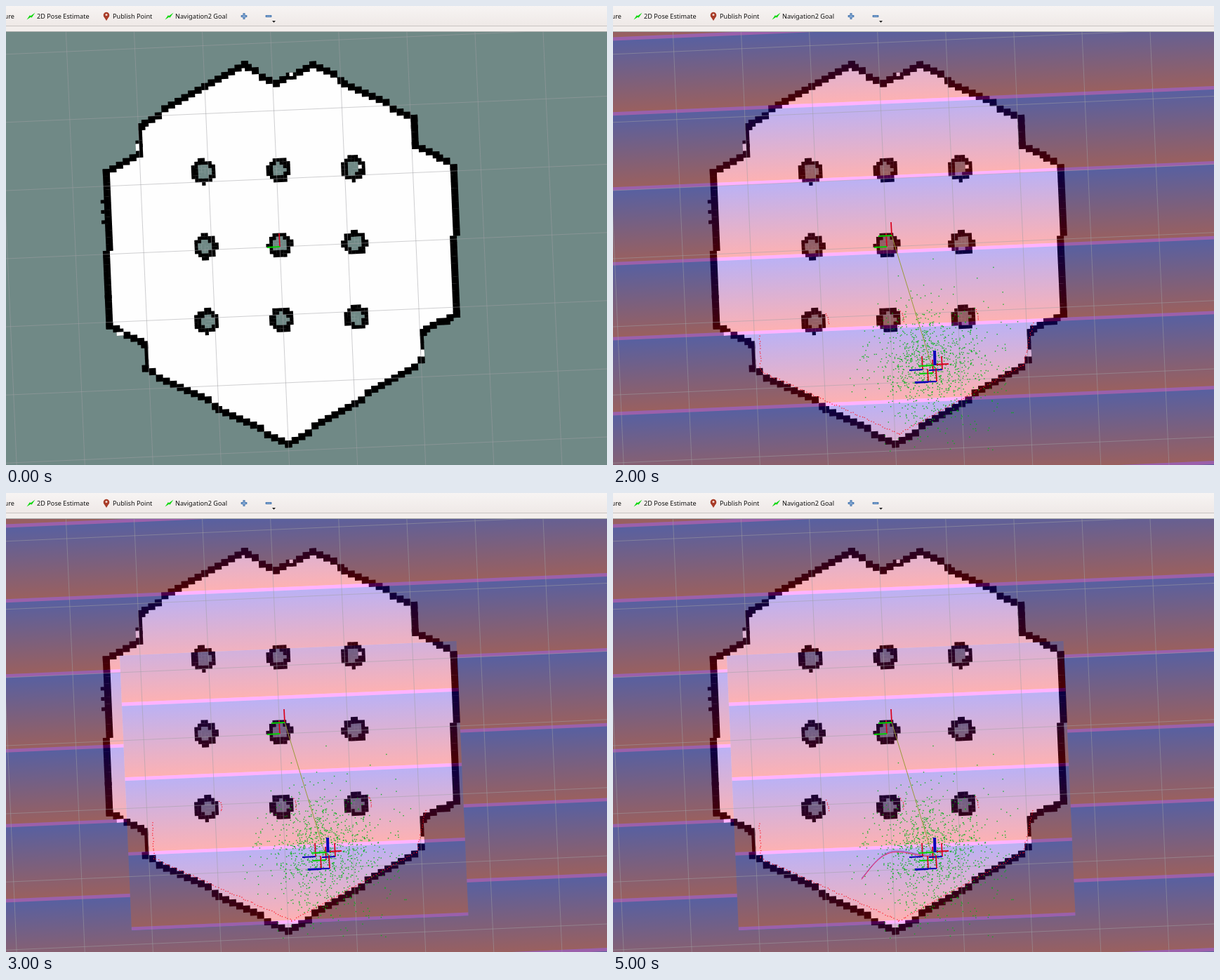
Write an HTML page with a canvas that moves like this. It is 856 px wide and 654 px high and loops after 6 s.

```html
<!DOCTYPE html>
<html lang="en">
<head>
<meta charset="utf-8">
<title>Map view</title>
<style>
  html, body { margin: 0; width: 100%; height: 100%; overflow: hidden; }
  body { position: relative; background: #708986; }
  canvas { position: absolute; left: 0; top: 0; }
  span {
    position: absolute; top: 8px; line-height: 13px; white-space: pre;
    font-family: "Noto Sans", "Open Sans", sans-serif; font-size: 9.17px; color: #111;
  }
</style>
</head>
<body>
<canvas id="view" width="856" height="654"></canvas>
<span style="right:calc(100% - 12px)">Measure</span>
<span style="left:44px">2D Pose Estimate</span>
<span style="left:152px">Publish Point</span>
<span style="left:241px">Navigation2 Goal</span>
<script>
const ctx = document.getElementById('view').getContext('2d');
const W = 856, H = 654, TOP = 37;
const OX = 390, OY = 343, TILT = 0.0435;   // map origin and rotation
const METRE = 97, CELL = METRE / 20, PERIOD = CELL * 22;
const ROBOT = [455, 516], ODOM = [397, 327];
const UNKNOWN = '#708986', FREE = '#fefefe', WALL = '#000';
const RED = '#d8001c', GREEN = '#00d000', BLUE = '#0a00b8';

const corners = [
  [338, 84], [384, 110], [436, 84], [580, 160], [584, 200], [637, 228],
  [642, 438], [592, 466], [592, 506], [400, 624], [201, 518], [198, 481],
  [148, 457], [142, 239], [190, 211], [191, 170]
];

function random(seed) {
  return () => {
    seed = (seed + 0x6D2B79F5) | 0;
    let t = Math.imul(seed ^ seed >>> 15, 1 | seed);
    t = t + Math.imul(t ^ t >>> 7, 61 | t) ^ t;
    return ((t ^ t >>> 14) >>> 0) / 4294967296;
  };
}

function toMap(x, y) {
  const dx = x - OX, dy = y - OY, c = Math.cos(TILT), s = Math.sin(TILT);
  return [dx * c - dy * s, dx * s + dy * c];
}

function inMap(paint) {
  ctx.save();
  ctx.translate(OX, OY);
  ctx.rotate(-TILT);
  paint();
  ctx.restore();
}

const snap = v => Math.round(v / CELL) * CELL;

// Block of w by h cells centred near a stage point
function block(x, y, w, h, color) {
  const [mx, my] = toMap(x, y);
  ctx.fillStyle = color;
  ctx.fillRect(snap(mx - w * CELL / 2), snap(my - h * CELL / 2), w * CELL + 0.3, h * CELL + 0.3);
}

function line(x1, y1, x2, y2, color, width = 2) {
  ctx.strokeStyle = color;
  ctx.lineWidth = width;
  ctx.beginPath();
  ctx.moveTo(x1, y1);
  ctx.lineTo(x2, y2);
  ctx.stroke();
}

function poly(points, color) {
  ctx.fillStyle = color;
  ctx.beginPath();
  points.forEach(p => ctx.lineTo(p[0], p[1]));
  ctx.closePath();
  ctx.fill();
}

function drawWall([x1, y1], [x2, y2]) {
  const dx = x2 - x1, dy = y2 - y1, length = Math.hypot(dx, dy);
  const width = Math.abs(dx) < 4 && length < 60 ? 1 : 2;
  const n = Math.ceil(Math.max(Math.abs(dx), Math.abs(dy)) / (2 * CELL));
  for (let k = 0; k <= n; k++) block(x1 + dx * k / n, y1 + dy * k / n, width, 2, WALL);
}

const pillar = (i, j) => [390.5 + 106.5 * i + 2.6 * j, 340 + 106.5 * j - 2.6 * i];

function eachPillar(visit) {
  for (let j = -1; j <= 1; j++)
    for (let i = -1; i <= 1; i++) visit(...pillar(i, j));
}

// Rough ring of cells around a hollow core
function drawPillar(x, y, rnd) {
  const [mx, my] = toMap(x, y);
  const cx = mx / CELL, cy = my / CELL;
  for (let r = Math.floor(cy) - 4; r <= cy + 4; r++) {
    for (let c = Math.floor(cx) - 4; c <= cx + 4; c++) {
      const d = Math.hypot(c + 0.5 - cx, r + 0.5 - cy) + (rnd() - 0.5) * 0.3;
      if (d > 3.6) continue;
      ctx.fillStyle = d < 2 ? UNKNOWN : WALL;
      ctx.fillRect(c * CELL, r * CELL, CELL + 0.3, CELL + 0.3);
    }
  }
}

function drawMap() {
  const rnd = random(3);
  ctx.fillStyle = UNKNOWN;
  ctx.fillRect(0, TOP, W, H - TOP);
  poly(corners, FREE);
  inMap(() => {
    corners.forEach((p, i) => drawWall(p, corners[(i + 1) % corners.length]));
    for (let y = 278; y < 320; y += 16) block(138, y, 1, 1, WALL);
    block(187, 194, 1, 1, WALL);
    block(187, 201, 1, 2, FREE);
    block(405, 97, 1, 1, FREE);
    block(162, 466, 2, 1, FREE);
    block(593, 494, 1, 2, FREE);
    eachPillar((x, y) => drawPillar(x, y, rnd));
    block(504, 229, 1, 1, FREE);
  });
}

function drawGrid() {
  const color = 'rgba(160,160,164,.5)';
  inMap(() => {
    for (let k = -5 * METRE; k <= 5 * METRE; k += METRE) {
      line(k, -600, k, 600, color, 1);
      line(-600, k, 600, k, color, 1);
    }
  });
}

// Repeating cost bands; base is the centre of one magenta row
function bands(base) {
  for (let k = -4; k < 5; k++) {
    const y = base + k * PERIOD + CELL / 2, end = y + PERIOD - CELL;
    const g = ctx.createLinearGradient(0, y, 0, end);
    g.addColorStop(0, 'rgba(32,0,222,.3)');
    g.addColorStop(1, 'rgba(250,0,5,.3)');
    ctx.fillStyle = g;
    ctx.fillRect(-600, y, 1200, end - y);
    ctx.fillStyle = 'rgba(255,0,255,.3)';
    ctx.fillRect(-600, end, 1200, CELL);
  }
}

function drawCosts(local) {
  const area = [-223, -121, 480, 392];
  inMap(() => {
    ctx.save();
    if (local) {
      ctx.beginPath();
      ctx.rect(-700, -700, 1400, 1400);
      ctx.rect(...area);
      ctx.clip('evenodd');
    }
    bands(7.4);
    ctx.restore();
    if (local) {
      ctx.beginPath();
      ctx.rect(...area);
      ctx.clip();
      bands(55);
    }
  });
}

function drawParticles() {
  const rnd = random(7);
  ctx.fillStyle = 'rgba(0,180,20,.9)';
  for (let i = 0; i < 1050; i++) {
    const spread = i % 5 < 3 ? 36 : 58;
    const r = spread * Math.sqrt(-2 * Math.log(1 - rnd())), a = rnd() * 2 * Math.PI;
    const x = 452 + r * Math.cos(a), y = 512 + r * Math.sin(a);
    if (x > 332 && x < 592 && y > 358 && y < 634) ctx.fillRect(x, y, 1.4, 1.4);
  }
}

// Laser returns: the lower walls and the near faces of the last pillar row
function drawScan(seed) {
  const rnd = random(seed);
  const dot = (x, y) => ctx.fillRect(x + rnd() * 2 - 1, y + rnd() * 2 - 1, 1.2, 1.2);
  const seen = [[208, 470], [210, 520], [407, 609], [584, 511], [598, 450]];
  ctx.fillStyle = '#ff1420';
  for (let i = 1; i < seen.length; i++) {
    const [x, y] = seen[i - 1], dx = seen[i][0] - x, dy = seen[i][1] - y;
    const n = Math.hypot(dx, dy) / 3.6;
    for (let k = 0; k < n; k++) dot(x + dx * k / n, y + dy * k / n);
  }
  for (let i = -1; i <= 1; i++) {
    const [x, y] = pillar(i, 1);
    for (let a = -0.6; a < 0.3; a += 0.15) dot(x + 20 * Math.cos(a), y + 20 * Math.sin(a));
  }
}

// Frame axes: x points up in red, the other axis points left
function axes(x, y, side, length = 19) {
  line(x, y, x - 1, y - 19, RED, 1.7);
  line(x, y, x - length, y + 1, side);
}

function drawRobot() {
  const [x, y] = ROBOT;
  line(...ODOM, x, y, '#9a9a38', 1);
  axes(...ODOM, GREEN);
  axes(x + 1, y + 7, GREEN);
  axes(x - 6, y + 20, BLUE);
  axes(x - 14, y + 2, BLUE);
  axes(x + 14, y + 2, BLUE);
  axes(x + 6, y + 19, BLUE, 31);
  line(x - 20, y - 3, x + 1, y - 4, GREEN);
  line(x + 2, y - 5, x + 23, y - 6, RED);
  line(x + 3, y - 25, x + 3.5, y - 4, BLUE, 4);
}

function drawPath() {
  for (const [off, color] of [[-1, '#9050c0'], [0.6, '#f02058']]) {
    ctx.strokeStyle = color;
    ctx.lineWidth = 1;
    ctx.beginPath();
    ctx.moveTo(354, 550 + off);
    ctx.bezierCurveTo(368, 533, 381, 512 + off, 402, 511 + off);
    ctx.bezierCurveTo(422, 510 + off, 432, 518 + off, 456, 517 + off);
    ctx.stroke();
  }
}

function shade(half, colors) {
  const g = ctx.createLinearGradient(0, -half, 0, half);
  colors.forEach((c, i) => g.addColorStop(i / (colors.length - 1), c));
  return g;
}

function drawArrow(x, y, tipX, tipY, flip) {
  const length = Math.hypot(tipX - x, tipY - y), neck = length - 48;
  ctx.save();
  ctx.translate(x, y);
  ctx.rotate(Math.atan2(tipY - y, tipX - x));
  ctx.scale(1, flip);
  poly([[0, -9.3], [neck, -9.3], [neck, 9.3], [0, 9.3]],
    shade(9.3, ['#006400', '#00e800', '#00ff00', '#00f400', '#00a000', '#005000']));
  poly([[neck, -17], [length, 0], [neck, 17]],
    shade(17, ['#007800', '#00c800', '#00a800', '#004c00']));
  ctx.restore();
}

function poseIcon(x) {
  poly([[x, 19.5], [x + 4.5, 13], [x + 5.5, 14.3], [x + 12, 9.5], [x + 7, 16.8], [x + 5.8, 15.8]], '#10d810');
}

function disc(x, y, r, color) {
  ctx.fillStyle = color;
  ctx.beginPath();
  ctx.arc(x, y, r, 0, 7);
  ctx.fill();
}

function signIcon(x, plus) {
  for (const [half, width, color] of [[4.3, 3, '#3a6ca8'], [3.4, 1, '#a0c0e4']]) {
    line(x - half, 14.5, x + half, 14.5, color, width);
    if (plus) line(x, 14.5 - half, x, 14.5 + half, color, width);
  }
}

function drawToolbar(pressed) {
  const g = ctx.createLinearGradient(0, 0, 0, 28);
  g.addColorStop(0, '#f7f4f3');
  g.addColorStop(1, '#efe9e7');
  const rows = [[0, 28, g], [28, 1, '#c9c4c2'], [29, 7, '#f3eeec'], [36, 1, '#a9adab']];
  for (const [y, h, color] of rows) {
    ctx.fillStyle = color;
    ctx.fillRect(0, y, W, h);
  }
  if (pressed) {
    ctx.beginPath();
    ctx.roundRect(pressed + 0.5, 3.5, 105, 22, 2);
    ctx.fillStyle = '#dcd8d6';
    ctx.fill();
    ctx.strokeStyle = '#b4b0ae';
    ctx.lineWidth = 1;
    ctx.stroke();
  }
  poseIcon(29.5);
  poseIcon(226.5);
  poly([[139.3, 15], [146.7, 15], [143, 21]], '#a83c28');
  disc(143, 13, 4.3, '#a83c28');
  disc(143, 12.6, 1.5, '#f0d8d0');
  signIcon(339, true);
  signIcon(374, false);
  poly([[379, 21], [384, 21], [381.5, 23.8]], '#222');
}

function draw(step) {
  const active = step >= 2;
  drawMap();
  if (active) drawCosts(step >= 3);
  drawGrid();
  axes(OX, OY, GREEN, 18);
  if (active) {
    drawParticles();
    drawScan(step);
    if (step === 5) drawPath();
    drawRobot();
  }
  if (step === 1) drawArrow(454, 522, 444, 282, 1);
  if (step === 4) drawArrow(354, 550, 113, 561, -1);
  drawToolbar(step === 1 ? 26 : step === 4 ? 222 : 0);
}

let shown = -1;
const t0 = performance.now();
function tick() {
  const step = Math.floor((performance.now() - t0) % 6000 / 1000);
  if (step !== shown) draw(shown = step);
  requestAnimationFrame(tick);
}
tick();
</script>
</body>
</html>
```
